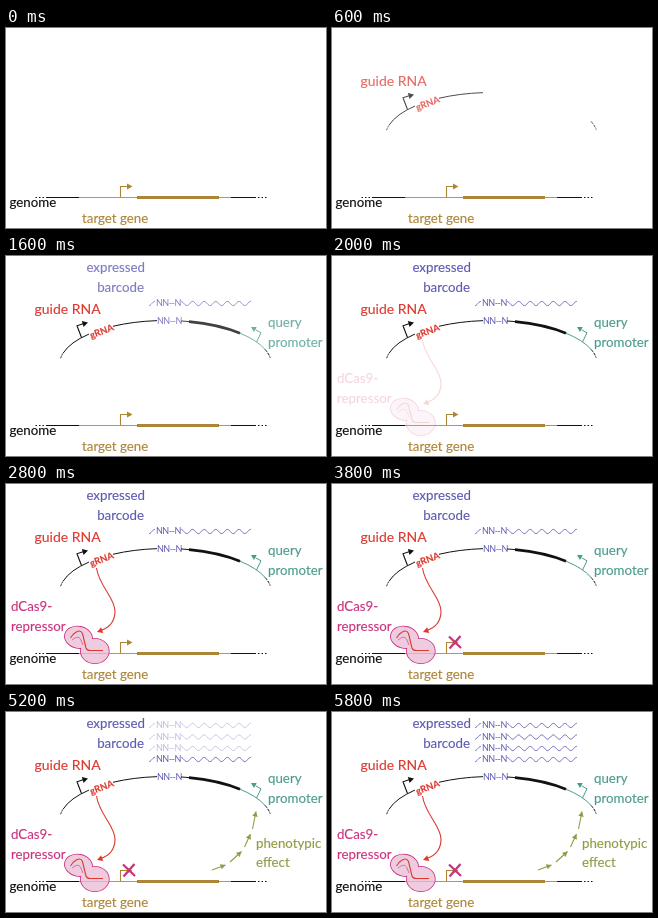
Write an HTML page that moves like this. It is 320 by 200 pixels and loops after 8 s.

```html
<!DOCTYPE html>
<html lang="en">
<head>
<meta charset="utf-8">
<title>Gene reporter</title>
<style>
html, body { margin: 0; width: 100%; height: 100%; overflow: hidden; background: #fff; }
svg { display: block; width: 100vw; height: 100vh; }
text { font-family: Lato, "Open Sans", sans-serif; font-size: 13.3px; stroke-width: .15; }
</style>
</head>
<body>
<svg id="stage" viewBox="0 0 320 200"></svg>
<script>
const LOOP = 8000, STEP = 200;
const black = '#111', gold = '#ad8536', red = '#dc3a30', violet = '#5d5ab2',
      teal = '#4b9b8d', magenta = '#c9347f', pink = '#efcbdf', olive = '#929a45';

const label = (x, y, str, color, extra = '') =>
  `<text x="${x}" y="${y}" fill="${color}" stroke="${color}" ${extra}>${str}</text>`;
const line = (d, color, width = 1, extra = '') =>
  `<path d="${d}" fill="none" stroke="${color}" stroke-width="${width}" ${extra}/>`;
const head = (x, y, angle, color, size = 5.5) =>
  `<path d="M0 0L${-size} ${-size * .55}V${size * .55}Z" fill="${color}" transform="translate(${x} ${y}) rotate(${angle})"/>`;

// Plasmid: upper half of an ellipse
const arcY = x => 108.5 - 44 * Math.sqrt(1 - ((x - 159.5) / 106) ** 2);
const arc = (a, b, color, width, extra) =>
  line(`M${a} ${arcY(a)}A106 44 0 0 1 ${b} ${arcY(b)}`, color, width, extra);

// Cosine strand; the phase is zero on a crest
const wave = (a, b, y, phase) => {
  let d = '';
  for (let x = a; x <= b; x += .5)
    d += `${d ? 'L' : 'M'}${x} ${(y - 2.1 * Math.cos((x - a) * Math.PI / 5.8 + phase)).toFixed(2)}`;
  return line(d, violet, .9);
};
const tag = (x, y) => label(x, y, 'NN--N', violet, 'style="font-size:9px;letter-spacing:-.5px;stroke:none"');
const transcript = y =>
  wave(143, 149, y - 2.5, Math.PI) + tag(150, y) + wave(175, 245, y - 2.5, 0);

const genome =
  line('M29.5 169.5H39M252 169.5H261', black, 1, 'stroke-dasharray="1.5 2"') +
  line('M40 169.5H73M225 169.5H250', black, 1.1) +
  line('M73 169.5H131M213 169.5H225', '#998c70', .9) +
  line('M131 169.5H213', gold, 3) +
  line('M114.5 169V158.5H121', gold, 1.1) + head(126.5, 158.5, 0, gold) +
  label(3.5, 179, 'genome', black) + label(76, 195, 'target gene', gold);

const guide =
  arc(57, 83, black, 1) + arc(107, 151, black, 1) +
  arc(54.6, 57, black, 1, 'stroke-dasharray="2 1"') +
  arc(259, 264.2, black, 1, 'stroke-dasharray="3 1.2"') +
  line('M75.5 81.5L71 69.8L77 67.8', black, 1.1) + head(82, 66.5, -16, black) +
  label(28.5, 58.3, 'guide RNA', red, 'style="font-size:14px"') +
  label(0, 0, 'gRNA', red, 'transform="translate(85.3 82.8) rotate(-21)" style="font-size:9.4px;font-weight:700"');

const barcode =
  label(139, 16, 'expressed', violet, 'text-anchor="end"') +
  label(138, 36, 'barcode', violet, 'text-anchor="end"') +
  transcript(50) + tag(151, 68) +
  arc(175, 183, black, 1) + arc(183, 234, black, 2.7) + arc(234, 259, teal, 1) +
  line('M250.5 86L255 76.8L249.5 73.7', teal, 1) + head(245, 71, 210, teal, 5) +
  label(262, 71, 'query', teal) + label(262, 91, 'promoter', teal);

const lobes =
  '<ellipse cx="72.5" cy="153.3" rx="13.7" ry="10.6" transform="rotate(12 72.5 153.3)"/>' +
  '<ellipse cx="88.8" cy="167" rx="14" ry="12.2"/>';
const repressor =
  `<g fill="${pink}" stroke="${magenta}" stroke-width="1.7">${lobes}</g><g fill="${pink}">${lobes}</g>` +
  line('M75 169.5H103', '#dfa0c4', .8) +
  line('M64.5 154L67 150.5Q74 144 76.5 149.5L80 164Q81 166.5 84 166.5H97', red, 1.1) +
  line('M66 156Q72 151 74.5 155L77 161', magenta, .6) +
  line('M90.5 84C93 102 109 114 109 127C109 138 102 144 95 146.5', red, 1.1) +
  head(91, 148, 160, red) +
  label(5, 126.5, 'dCas9-', magenta) + label(5, 147, 'repressor', magenta);

const cross = line('M117 152.5L129 164M128.5 152L117.5 164.5', magenta, 2.3);

const effect =
  [[206, 158, 219.5, 153], [224, 150, 235.5, 139.5], [238.5, 135, 244.5, 122], [246.5, 117, 250, 99.5]]
    .map(([a, b, c, d]) => line(`M${a} ${b}L${c} ${d}`, olive, 1.1) +
      head(c, d, Math.atan2(d - b, c - a) * 180 / Math.PI, olive, 5)).join('') +
  label(250, 136, 'phenotypic', olive) + label(250, 155, 'effect', olive);

const copies = [16, 27.5, 39].map(transcript).join('');

// Each layer fades in over five ticks, one after the other
const layers = [guide, barcode, repressor, cross, effect, copies];
const stage = document.getElementById('stage');
stage.innerHTML = genome + layers.map(s => `<g class="layer">${s}</g>`).join('');
const groups = [...stage.querySelectorAll('.layer')];

function draw(time) {
  const tick = Math.floor(time % LOOP / STEP);
  groups.forEach((g, i) => {
    const alpha = i ? (tick - i * 5 + 1) / 5 : tick / 4;
    g.setAttribute('opacity', Math.max(0, Math.min(1, alpha)));
  });
}

const start = performance.now();
function loop(now) {
  draw(Math.max(0, now - start));
  requestAnimationFrame(loop);
}
draw(0);
requestAnimationFrame(loop);
</script>
</body>
</html>
```
